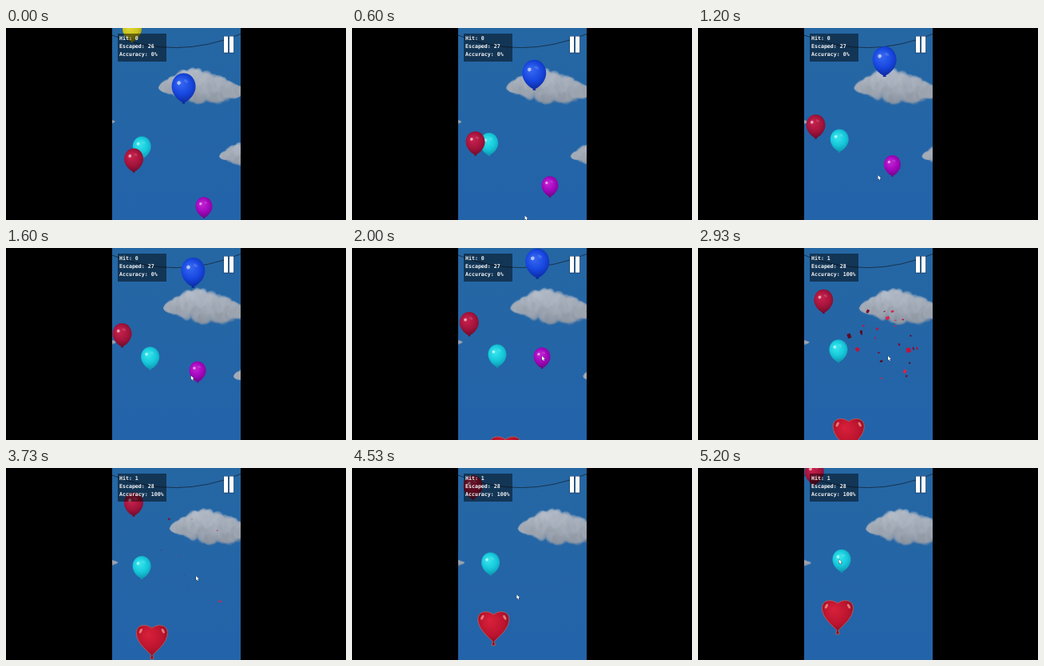
Recreate the animation shown at these times as an HTML page with a canvas. Size 426 by 240 pixels, loop 5.27 s.

```html
<!DOCTYPE html>
<html lang="en">
<head>
<meta charset="utf-8">
<title>Balloon game</title>
<style>
html, body { margin: 0; width: 100%; height: 100%; overflow: hidden; background: #000; }
canvas { display: block; width: 426px; height: 240px; }
</style>
</head>
<body>
<canvas id="stage" width="426" height="240"></canvas>
<script>
const stage = document.getElementById('stage');
const ctx = stage.getContext('2d');
const LOOP = 5270, STEP = 1000 / 15, LAST = 78;
const LEFT = 133, RIGHT = 294, TAU = Math.PI * 2;
const POP = 2.4, SLOW = 0.753;

// Each balloon rises steadily and sways around x; peak is the time it is furthest right
const yellow = { x: 158, y: 3, rise: 28, sway: 0, peak: 0, w: 24, tint: ['#e4dd3c', '#c9c21c', '#8d880e'] };
const blue = { x: 228, y: 75.5, rise: 27.9, sway: 6.5, peak: 1.5, w: 30, tint: ['#3a6cf4', '#1747df', '#0a2492'] };
const cyan = { x: 176, y: 150, rise: 7.5, sway: 6, peak: 2, w: 23, tint: ['#3ceaf0', '#16c8da', '#0c8ca6'] };
const red = { x: 153, y: 165.5, rise: 35.2, sway: 7.5, peak: -0.2, w: 24, tint: ['#cc2450', '#a5143c', '#650a28'] };
const purple = { x: 243.3, y: 224.5, rise: 43.5, sway: 5.4, peak: 0.3, w: 21, tint: ['#c828d8', '#a206bc', '#64067c'] };
const heart = { x: 183.5, y: 291, rise: 28, sway: 8.7, peak: 1.9, period: 7 };
const balloons = [yellow, blue, cyan, red, purple];

// Pointer path: seconds, x, y
const pointer = [[0.5, 215, 243], [1.2, 225.5, 184], [2, 238, 135], [3.9, 238, 135], [4.53, 206.5, 158.5], [5.2, 176.5, 114]];

const lerp = (a, b, u) => a + (b - a) * u;
const clamp = v => Math.max(0, Math.min(1, v));

function seeded(seed) {
  return () => {
    seed = (seed * 16807) % 2147483647;
    return seed / 2147483647;
  };
}

function place(b, t) {
  const travel = Math.min(t, POP) + SLOW * Math.max(0, t - POP);
  return [b.x + b.sway * Math.cos(TAU * (t - b.peak) / (b.period || 3.7)), b.y - b.rise * travel];
}

function ellipse(x, y, rx, ry, fill, turn = 0) {
  ctx.fillStyle = fill;
  ctx.beginPath();
  ctx.ellipse(x, y, rx, ry, turn, 0, TAU);
  ctx.fill();
}

// Soft puffs scattered inside a lopsided envelope, lighter towards the top
function makeCloud(w, h, count, seed) {
  const pad = 4, img = document.createElement('canvas');
  img.width = w + pad * 2;
  img.height = h + pad * 2;
  const c = img.getContext('2d'), rand = seeded(seed);
  for (let i = 0; i < count; i++) {
    const u = 0.02 + 0.96 * (i + rand()) / count;
    const top = h * (0.54 - 0.52 * Math.sin(Math.PI * u ** 0.8) ** 1.2);
    const bottom = h * (0.54 + 0.45 * Math.sin(Math.PI * u ** 1.3) ** 0.6);
    const r = Math.min((bottom - top) * 0.5, h * (0.09 + 0.09 * rand()));
    const x = pad + u * w, y = pad + lerp(top + r, bottom - r, rand());
    const light = lerp(190, 136, clamp((y - pad) / h)) + 16 * (rand() - 0.5);
    const color = a => `rgba(${light},${light + 8},${light + 20},${a})`;
    const g = c.createRadialGradient(x, y - r * 0.2, 0, x, y, r);
    g.addColorStop(0, color(0.85));
    g.addColorStop(0.65, color(0.6));
    g.addColorStop(1, color(0));
    c.fillStyle = g;
    c.fillRect(x - r, y - r, r * 2, r * 2);
  }
  return (x, y) => ctx.drawImage(img, x - pad, y - pad);
}

const bigCloud = makeCloud(108, 52, 230, 11);
const sideCloud = makeCloud(90, 42, 170, 5);
const edgeCloud = makeCloud(40, 15, 100, 8);

const rand = seeded(77);
const shades = ['#7c0a2a', '#c0123e', '#5e0a20', '#d8264e'];
const confetti = Array.from({ length: 27 }, (_, i) => ({
  angle: TAU * rand(),
  reach: 20 + 60 * rand(),
  size: 2.2 + 3.6 * rand() ** 2,
  thick: 0.45 + 0.5 * rand(),
  life: 0.75 + 0.85 * rand(),
  color: shades[i % shades.length]
}));

function drawSky() {
  const g = ctx.createLinearGradient(0, 0, 0, 240);
  g.addColorStop(0, '#2567a3');
  g.addColorStop(1, '#2363aa');
  ctx.fillStyle = g;
  ctx.fillRect(LEFT, 0, RIGHT - LEFT, 240);
}

function drawWire() {
  ctx.strokeStyle = '#17324f';
  ctx.lineWidth = 1;
  ctx.beginPath();
  ctx.moveTo(LEFT, 9);
  ctx.quadraticCurveTo(213, 41, RIGHT, 7.5);
  ctx.stroke();
}

const escaped = (b, t) => place(b, t)[1] < 0;

function drawBalloon(b, t) {
  if (escaped(b, t) || (b === purple && t >= POP)) return;
  const { w, tint } = b, h = w * 1.26;
  ctx.save();
  ctx.translate(...place(b, t));
  const g = ctx.createRadialGradient(-w * 0.16, -h * 0.2, 0, 0, -h * 0.05, h * 0.58);
  [0, 0.55, 1].forEach((at, i) => g.addColorStop(at, tint[i]));
  ctx.fillStyle = g;
  ctx.beginPath();
  for (const side of [1, -1]) {
    ctx.moveTo(0, -h / 2);
    ctx.bezierCurveTo(side * w * 0.3, -h / 2, side * w / 2, -h * 0.3, side * w / 2, -h * 0.06);
    ctx.bezierCurveTo(side * w / 2, h * 0.2, side * w * 0.2, h * 0.42, side * w * 0.04, h * 0.46);
    ctx.lineTo(side * w * 0.08, h / 2);
    ctx.lineTo(0, h / 2);
  }
  ctx.fill();
  ctx.fillRect(-0.5, -h / 2 + 0.3, 1, h - 0.3);
  ellipse(-w * 0.2, -h * 0.18, w * 0.08, h * 0.06, 'rgba(255,255,255,.6)', -0.6);
  ellipse(w * 0.1, -h * 0.24, w * 0.1, h * 0.05, 'rgba(255,255,255,.14)', 0.5);
  ctx.restore();
}

function drawHeart(t) {
  ctx.save();
  ctx.translate(...place(heart, t));
  const g = ctx.createRadialGradient(-5, 12, 1, 0, 17, 25);
  g.addColorStop(0, '#d8203a');
  g.addColorStop(0.6, '#bc142f');
  g.addColorStop(1, '#860c24');
  ctx.fillStyle = g;
  ctx.beginPath();
  ctx.moveTo(0, 4.5);
  ctx.bezierCurveTo(6, -1, 20, -1, 19.5, 11);
  ctx.bezierCurveTo(19, 22, 9, 30, 1, 38);
  ctx.lineTo(2.3, 43);
  ctx.lineTo(-2.3, 43);
  ctx.lineTo(-1, 38);
  ctx.bezierCurveTo(-9, 30, -19, 22, -19.5, 11);
  ctx.bezierCurveTo(-20, -1, -6, -1, 0, 4.5);
  ctx.fill();
  ctx.strokeStyle = 'rgba(204,104,84,.8)';
  ctx.lineWidth = 0.9;
  ctx.stroke();
  for (const side of [1, -1]) ellipse(side * 14, 8, 1.5, 3.2, 'rgba(255,190,170,.6)', -side * 0.5);
  ctx.restore();
}

function drawConfetti(t) {
  const age = t - POP;
  if (age < 0) return;
  const [x, y] = place(purple, POP);
  const spread = 1 - Math.exp(-2.2 * age);
  for (const p of confetti) {
    ctx.save();
    ctx.globalAlpha = clamp((p.life - age) / 0.3);
    ctx.translate(x - 3 + Math.cos(p.angle) * p.reach * spread * 0.85, y + Math.sin(p.angle) * p.reach * spread);
    ctx.rotate(p.angle + age * 2);
    const size = p.size * clamp(1.5 - age * 0.6);
    ctx.fillStyle = p.color;
    ctx.fillRect(-size / 2, -size * p.thick / 2, size, size * p.thick);
    ctx.restore();
  }
}

function drawHud(t) {
  ctx.fillStyle = 'rgba(0,0,0,.48)';
  ctx.fillRect(140, 7, 61, 35);
  const hit = t >= POP ? 1 : 0;
  const missed = 26 + [yellow, blue].filter(b => escaped(b, t)).length;
  ctx.fillStyle = '#f4f6f8';
  ctx.font = 'bold 6.6px "DejaVu Sans Mono", "Noto Sans Mono", monospace';
  [`Hit: ${hit}`, `Escaped: ${missed}`, `Accuracy: ${hit * 100}%`]
    .forEach((line, i) => ctx.fillText(line, 142, 15 + i * 10));
  for (const x of [273, 280]) {
    ctx.fillStyle = 'rgba(10,30,60,.6)';
    ctx.fillRect(x - 0.5, 10, 6.5, 21.5);
    ctx.fillStyle = '#fff';
    ctx.fillRect(x, 10.5, 5.2, 20.2);
  }
}

function drawPointer(t) {
  const i = pointer.findIndex(p => p[0] >= t);
  if (i === 0) return;
  const [t0, x0, y0] = pointer.at(i < 0 ? -2 : i - 1), [t1, x1, y1] = pointer.at(i);
  const u = clamp((t - t0) / (t1 - t0));
  ctx.save();
  ctx.translate(lerp(x0, x1, u), lerp(y0, y1, u));
  ctx.beginPath();
  [[0, 0], [0, 5.2], [1.2, 4.2], [2.1, 6.2], [3, 5.8], [2.2, 3.9], [3.8, 3.8]].forEach(p => ctx.lineTo(...p));
  ctx.closePath();
  ctx.strokeStyle = 'rgba(10,20,40,.75)';
  ctx.lineWidth = 0.8;
  ctx.stroke();
  ctx.fillStyle = '#fff';
  ctx.fill();
  ctx.restore();
}

function draw(t) {
  ctx.fillStyle = '#000';
  ctx.fillRect(0, 0, stage.width, stage.height);
  ctx.save();
  ctx.beginPath();
  ctx.rect(LEFT, 0, RIGHT - LEFT, 240);
  ctx.clip();
  drawSky();
  bigCloud(191 + 3.7 * t, 47 + 0.25 * t);
  sideCloud(267 + 11.2 * t, 138);
  edgeCloud(96.5 + t, 108 + 0.3 * t);
  drawWire();
  balloons.forEach(b => drawBalloon(b, t));
  drawHeart(t);
  drawConfetti(t);
  drawHud(t);
  drawPointer(t);
  ctx.restore();
}

const start = performance.now();
function tick() {
  const ms = (performance.now() - start) % LOOP;
  const step = Math.min(LAST, Math.floor((ms + 5) / STEP));
  draw(step * STEP / 1000);
  requestAnimationFrame(tick);
}
tick();
</script>
</body>
</html>
```
